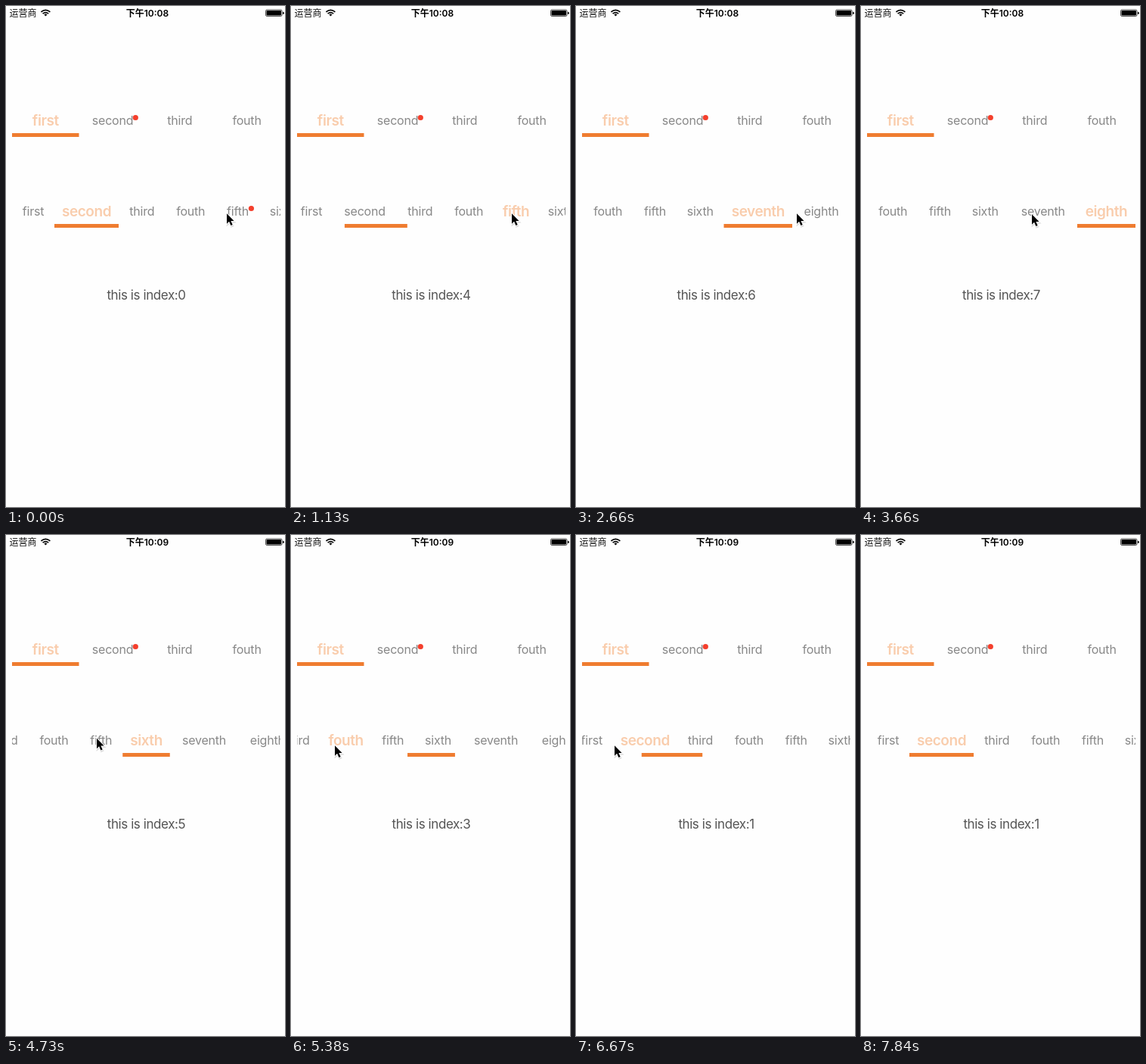
These frames come from a looping animation (369x662 px, 8.62 s). An HTML page:

```html
<!DOCTYPE html>
<html lang="zh-CN">
<head>
<meta charset="utf-8">
<title>Tab bars</title>
<style>
  html, body { margin: 0; width: 100%; height: 100%; overflow: hidden; background: #fefefe; }
  svg { display: block; width: 369px; height: 662px; }
  text { font-family: Inter, "Noto Sans CJK SC", "Noto Sans CJK", sans-serif; text-anchor: middle; }
  .tab { font-size: 16px; letter-spacing: -.2px; fill: #888; }
  .tab.on { font-size: 19px; letter-spacing: -.45px; font-weight: 600; fill: #f9cdad; }
  .bar { fill: #ef7c30; }
  .dot { fill: #f43f2c; }
  .status { font-size: 12px; fill: #111; }
  #clock { font-weight: 600; fill: #000; }
  #label { font-size: 17px; letter-spacing: -.42px; fill: #555; }
</style>
</head>
<body>
<svg viewBox="0 0 369 662">
  <defs>
    <clipPath id="view"><rect x="8" y="255" width="355" height="45"/></clipPath>
  </defs>
  <rect width="369" height="662" fill="#fefefe"/>

  <text class="status" x="22.5" y="13.5">运营商</text>
  <g fill="none" stroke="#000" stroke-width="1.7">
    <path d="M46.4 7.9Q52.4 2.9 58.4 7.9"/>
    <path d="M48.6 10.2Q52.4 7 56.2 10.2"/>
  </g>
  <path d="M50.3 11.3Q52.4 9.7 54.5 11.3L52.4 13.5Z"/>
  <text class="status" id="clock" x="187" y="13.5"></text>
  <rect x="343.5" y="5" width="21.5" height="8.5" rx="1.6" fill="none" stroke="#000" stroke-width=".7"/>
  <rect x="344.5" y="6" width="19.5" height="6.5" rx=".8"/>
  <path d="M366 7.4Q367.8 7.8 367.8 9.25T366 11.1Z"/>

  <g id="fixedTabs">
    <rect class="bar" x="8" y="168" width="88.5" height="5"/>
    <circle class="dot" cx="171.3" cy="147.5" r="3.6"/>
  </g>
  <g clip-path="url(#view)">
    <g id="scroller">
      <rect class="bar" id="bar" y="288" height="5"/>
      <circle class="dot" id="dot" cx="324.4" cy="267.5" r="3.6"/>
    </g>
  </g>
  <text id="label" x="185.5" y="388"></text>

  <g id="cursor">
    <path d="M1 1.2V14.7L4.1 11.8L6.4 17L8.7 16L6.4 11H10.6Z" transform="translate(.6 1.4)"
          fill="#000" stroke="#000" stroke-width="2" opacity=".13"/>
    <path d="M1 1.2V14.7L4.1 11.8L6.4 17L8.7 16L6.4 11H10.6Z"
          stroke="#fff" stroke-width="1.8" paint-order="stroke"/>
  </g>
</svg>
<script>
const LOOP = 8620, STEP = 58;
const names = ["first", "second", "third", "fouth", "fifth", "sixth", "seventh", "eighth"];
const edges = [8, 64, 149, 210.5, 278, 335, 397.5, 488, 565];

// [start, steps, tab index]
const picks = [[1130, 6, 4], [2370, 6, 6], [3370, 6, 7], [4490, 5, 5], [5380, 6, 3], [6440, 6, 1]];
// [start, steps, x, y]
const moves = [
  [3020, 2, 301, 274], [3486, 4, 225, 274], [3718, 6, 158, 276], [4610, 3, 119, 267.5],
  [4788, 5, 57, 277], [6030, 3, 50, 277], [7090, 8, 320, 647], [7780, 1, 320, 652]
];

const $ = id => document.getElementById(id);
const mix = (a, b, p) => a + (b - a) * p;
const smooth = p => p * p * (3 - 2 * p);
const progress = (t, start, steps) =>
  t < start ? 0 : Math.min(1, (Math.floor((t - start) / STEP) + 1) / steps);
const middle = i => (edges[i] + edges[i + 1]) / 2;
const scrollFor = i => Math.max(0, Math.min(202, middle(i) - 185.5));

function addTab(parent, name, x, y) {
  const tab = document.createElementNS("http://www.w3.org/2000/svg", "text");
  tab.textContent = name;
  tab.setAttribute("x", x);
  tab.setAttribute("y", y);
  tab.setAttribute("class", "tab");
  parent.insertBefore(tab, parent.querySelector(".dot"));
  return tab;
}

names.slice(0, 4).forEach((name, i) => {
  const tab = addTab($("fixedTabs"), name, 52.3 + 88.75 * i, i ? 156.5 : 157.5);
  tab.classList.toggle("on", i === 0);
});
const tabs = names.map((name, i) => addTab($("scroller"), name, middle(i), 276.5));

function draw(t) {
  let selected = 1, scroll = 0, left = edges[1], right = edges[2];
  for (const [start, steps, index] of picks) {
    if (t < start) break;
    const p = smooth(progress(t, start, steps));
    selected = index;
    scroll = mix(scroll, scrollFor(index), p);
    left = mix(left, edges[index], p);
    right = mix(right, edges[index + 1], p);
  }
  tabs.forEach((tab, i) => {
    tab.classList.toggle("on", i === selected);
    tab.setAttribute("y", i === selected ? 277.5 : 276.5);
  });
  $("scroller").setAttribute("transform", `translate(${-scroll} 0)`);
  $("bar").setAttribute("x", left);
  $("bar").setAttribute("width", right - left);
  $("dot").style.display = t < picks[0][0] ? "" : "none";
  $("label").textContent = "this is index:" + (t < picks[0][0] ? 0 : selected);
  $("clock").textContent = t < 4610 ? "下午10:08" : "下午10:09";

  let x = 291, y = 273;
  for (const [start, steps, toX, toY] of moves) {
    const p = smooth(progress(t, start, steps));
    x = mix(x, toX, p);
    y = mix(y, toY, p);
  }
  $("cursor").setAttribute("transform", `translate(${x} ${y})`);
  $("cursor").style.display = t < 7840 ? "" : "none";
}

const begin = performance.now();
function tick() {
  draw((performance.now() - begin) % LOOP);
  requestAnimationFrame(tick);
}
tick();
</script>
</body>
</html>
```
